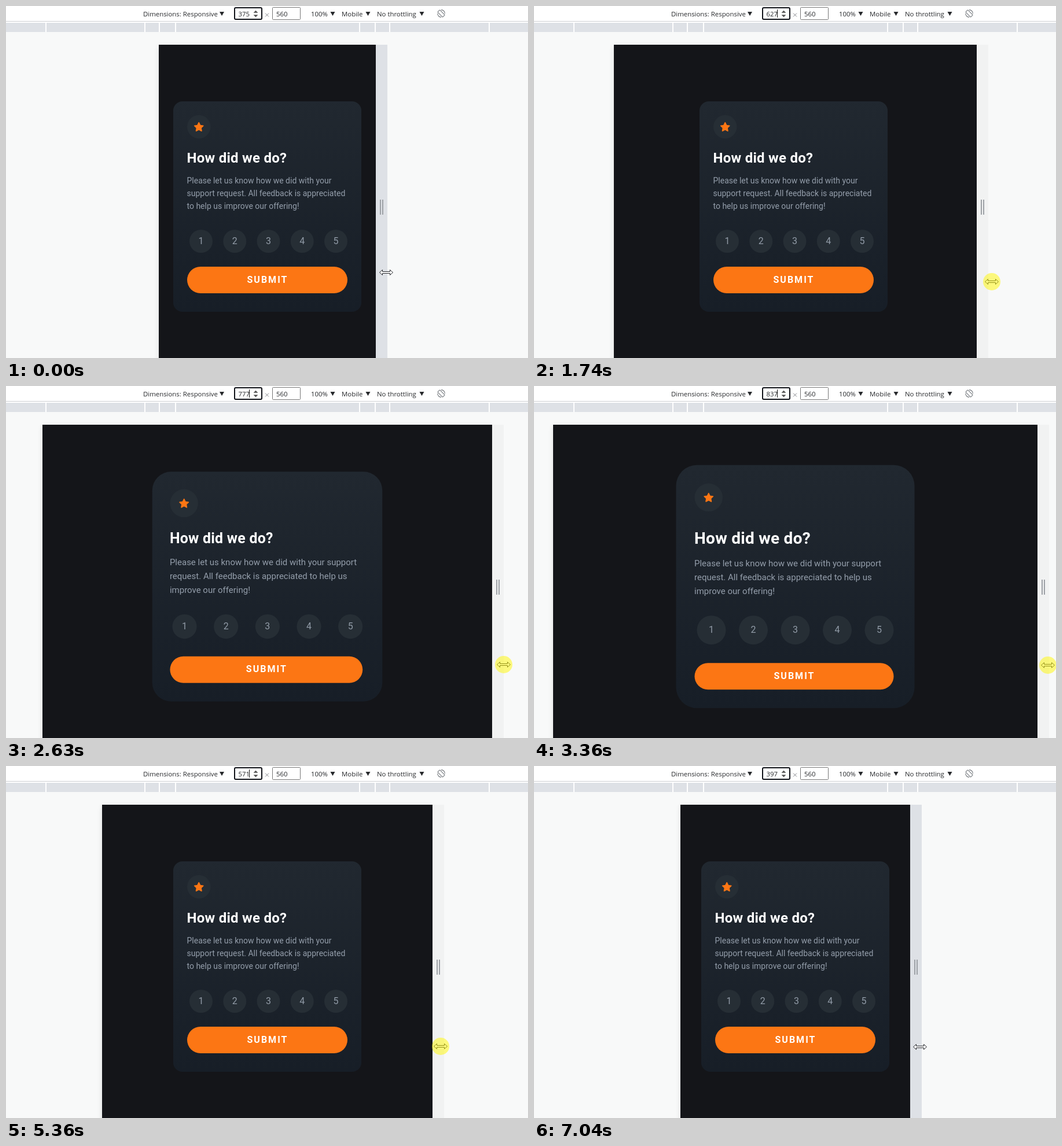
Animation of 902 by 609 pixels, one loop 7170 ms. Source, as an HTML page:

```html
<!DOCTYPE html>
<html lang="en">
<head>
<meta charset="utf-8">
<title>Responsive rating card</title>
<style>
  html, body { margin: 0; width: 100%; height: 100%; overflow: hidden; background: #f8f9f9; }
  svg { display: block; width: 902px; height: 609px; }
  .bar { font: 11.4px "Open Sans", "Noto Sans", sans-serif; fill: #27292c; }
  .card { font-family: Roboto, sans-serif; }
  #title { font-weight: 700; letter-spacing: .25px; fill: #fff; }
  #para { fill: #949eab; }
  .num { font-size: 16px; fill: #929ca8; text-anchor: middle; }
  #label { font-size: 16px; font-weight: 700; letter-spacing: 2px; fill: #fff; text-anchor: middle; }
</style>
</head>
<body>
<svg id="stage" viewBox="0 0 902 609" xmlns="http://www.w3.org/2000/svg">
  <defs>
    <linearGradient id="fill" x1="0" y1="0" x2="0" y2="1">
      <stop offset="0" stop-color="#212830"/>
      <stop offset="1" stop-color="#171e27"/>
    </linearGradient>
    <filter id="blur" x="-10%" y="-10%" width="120%" height="120%"><feGaussianBlur stdDeviation="5"/></filter>
  </defs>
  <rect width="902" height="609" fill="#f8f9f9"/>

  <rect id="shadow" y="70" height="560" opacity=".1" filter="url(#blur)"/>
  <rect id="band" y="67" width="20" height="560"/>
  <path id="grip" fill="#9da1a6"/>
  <rect id="page" y="67" height="560" fill="#141519"/>

  <g class="card">
    <rect id="panel" fill="url(#fill)"/>
    <circle id="badge" fill="#262e35"/>
    <path id="star" fill="#fc7614" stroke="#fc7614" stroke-width="1.6" stroke-linejoin="round"/>
    <text id="title">How did we do?</text>
    <g id="para"><text></text><text></text><text></text></g>
    <g id="rates"></g>
    <rect id="button" height="46" rx="23" fill="#fc7614"/>
    <text id="label">SUBMIT</text>
  </g>

  <rect width="902" height="45" fill="#fff"/>
  <rect y="26" width="902" height="1" fill="#cbcdd1"/>
  <rect y="29" width="902" height="16" fill="#dee1e6"/>
  <path id="marks" stroke="#fff" stroke-width="2"/>
  <g class="bar">
    <text x="237" y="18">Dimensions: Responsive</text>
    <text x="527" y="18">100%</text>
    <text x="580" y="18">Mobile</text>
    <text x="641" y="18">No throttling</text>
    <rect x="395" y="3" width="47" height="20" rx="2" fill="#fff" stroke="#101218" stroke-width="2"/>
    <text id="size" x="401.5" y="18"></text>
    <rect x="460.5" y="2.5" width="48" height="21" rx="1" fill="#fff" stroke="#767676"/>
    <text x="467" y="18">560</text>
  </g>
  <path d="M427.5 11.8L431.5 7.8L435.5 11.8ZM427.5 15.2L431.5 19.2L435.5 15.2Z" fill="#505050"/>
  <path d="M448 12.5l6 6m0-6l-6 6" stroke="#85888c"/>
  <path id="drops" fill="#27292c"/>
  <g transform="translate(752 13) rotate(45)" fill="none" stroke="#75797e" stroke-width="1.1">
    <rect x="-6.2" y="-2.7" width="12.4" height="5.4" rx="1"/>
    <path d="M-4.6 -4.4A6.4 6.4 0 0 1 4.6 -4.4M4.6 4.4A6.4 6.4 0 0 1 -4.6 4.4"/>
  </g>
  <rect id="caret" x="420" y="6" width="1" height="14" fill="#101010"/>

  <g id="pointer">
    <path d="M-11.5 0L-6.5 -4.5V-1.5H6.5V-4.5L11.5 0L6.5 4.5V1.5H-6.5V4.5Z" fill="#fff" stroke="#26282c"/>
    <circle id="glow" r="15" fill="#fff700"/>
  </g>
</svg>
<script>
const LOOP = 7170, MID = 451.5, BREAK = 768;
const $ = id => document.getElementById(id);
const set = (el, attrs) => { for (const k in attrs) el.setAttribute(k, attrs[k]); };
const clamp = x => Math.max(0, Math.min(1, x));
const mix = (a, b, k) => a + (b - a) * k;

// time, page width, pointer offset from the page edge, pointer y, refreshes until the next key
const keys = [
  [0, 375, 18, 461, 1], [590, 375, 18, 461, 1], [660, 379, 19, 462, 10],
  [1340, 499, 24, 471, 1], [1420, 523, 25, 473, 5], [1740, 627, 26, 477, 1],
  [1820, 647, 25, 478, 4], [2090, 699, 21, 480, 1], [2140, 707, 21, 480, 7],
  [2630, 777, 20, 482, 1], [2690, 787, 20, 482, 2], [2830, 805, 20, 483, 1],
  [2890, 811, 20, 483, 7], [3360, 837, 18, 483, 1], [4360, 837, 18, 483, 1],
  [4430, 823, 14, 483, 4], [4700, 745, 5, 483, 6], [5100, 645, 7, 484, 1],
  [5170, 626, 9, 484, 3], [5360, 571, 14, 485, 7], [5830, 481, 13, 485, 1],
  [5890, 471, 13, 485, 9], [6500, 397, 17, 486, 1], [LOOP, 397, 17, 486, 1]
];
const secant = i => keys[i] && keys[i + 1] ? (keys[i + 1][1] - keys[i][1]) / (keys[i + 1][0] - keys[i][0]) : 0;
const slope = i => {
  const a = secant(i - 1), b = secant(i);
  return a * b > 0 ? 2 * a * b / (a + b) : 0;
};

function pose(t) {
  let i = 0;
  while (i < keys.length - 2 && t >= keys[i + 1][0]) i++;
  const a = keys[i], b = keys[i + 1], span = b[0] - a[0], n = a[4];
  const k = Math.floor((t - a[0]) / span * n + 1e-6) / n;
  const u = 1 - k;
  const w = a[1] * (1 + 2 * k) * u * u + b[1] * k * k * (3 - 2 * k)
    + span * k * u * (slope(i) * u - slope(i + 1) * k);
  return {
    time: a[0] + span * k,
    width: 2 * Math.round((w - 1) / 2) + 1,
    off: Math.round(mix(a[2], b[2], k)),
    y: Math.round(mix(a[3], b[3], k))
  };
}

const wraps = {
  narrow: ["Please let us know how we did with your", "support request. All feedback is appreciated", "to help us improve our offering!"],
  medium: ["Please let us know how we did with your", "support request. All feedback is appreciated to", "help us improve our offering!"],
  wide: ["Please let us know how we did with your support", "request. All feedback is appreciated to help us", "improve our offering!"]
};

function starPath(cx, cy) {
  let d = "";
  for (let i = 0; i < 10; i++) {
    const r = i % 2 ? 4 : 8, a = i * Math.PI / 5 - Math.PI / 2;
    d += (i ? "L" : "M") + (cx + r * Math.cos(a)).toFixed(2) + " " + (cy + r * Math.sin(a)).toFixed(2);
  }
  return d + "Z";
}

const NS = "http://www.w3.org/2000/svg";
const rates = [1, 2, 3, 4, 5].map(n => {
  const disc = document.createElementNS(NS, "circle"), text = document.createElementNS(NS, "text");
  set(disc, { fill: "#262e35" });
  set(text, { class: "num" });
  text.textContent = n;
  $("rates").append(disc, text);
  return { disc, text };
});
set($("marks"), { d: [69, 240, 265, 293, 611, 638, 663, 835].map(x => `M${x} 28V45`).join("") });
set($("drops"), { d: [373, 564.5, 625.5, 718.5].map(x => `M${x - 4} 10h8l-4 7z`).join("") });

// box: card size and padding, type: title and rating discs
function growth(t) {
  if (t < 3800) return { box: clamp((t - 2560) / 84), type: clamp((t - 2560) / 150) ** 2 };
  return { box: 1 - clamp((t - 4632) / 103), type: 1 - clamp((t - 4632) / 175) ** 2 };
}

function drawCard(t, width) {
  const { box, type } = growth(t), wide = width >= BREAK ? 1 : 0;
  const mid = MID - (t > 1600 && t < 1900 ? 3 : 0);
  const cardW = mix(325, 412, box), pad = mix(24, 32, box);
  const x = mid - cardW / 2, left = x + pad, right = x + cardW - mix(24, 36, box);
  const badge = wide ? 48 : 40, lead = wide ? 24 : 22, disc = mix(40, 50, type);
  const gaps = [pad, badge, mix(42, 56, type), 36 + 1.7 * (wide + type), 2 * lead, 36 + wide, disc, pad, 46, 32];
  const cardH = gaps.reduce((a, b) => a + b);
  let y = 347 - cardH / 2;
  set($("panel"), { x, y, width: cardW, height: cardH, rx: mix(16, 36, box) });

  const r = badge / 2 + .25, cy = y + pad + badge / 2;
  set($("badge"), { cx: left + r, cy, r });
  set($("star"), { d: starPath(left + r, cy + .7) });

  y += pad + badge + gaps[2];
  set($("title"), { x: left - .5, y, "font-size": mix(24, 28, type) });
  y += gaps[3];
  const lines = wraps[wide ? "wide" : right - left > 292 ? "medium" : "narrow"];
  [...$("para").children].forEach((el, i) => {
    set(el, { x: left - .5, y: y + i * lead, "font-size": wide ? 15 : 14 });
    el.textContent = lines[i];
  });

  y += gaps[4] + gaps[5] + disc / 2;
  rates.forEach((rate, i) => {
    const cx = mix(left + 4 + disc / 2, right - disc / 2, i / 4);
    set(rate.disc, { cx, cy: y, r: disc / 2 });
    set(rate.text, { x: cx, y: y + 4.5 });
  });

  y += disc / 2 + pad;
  set($("button"), { x: left, y, width: right - left });
  set($("label"), { x: (left + right) / 2 + .5, y: y + 27.5 });
}

function draw(t) {
  const p = pose(t), x = MID - p.width / 2, edge = x + p.width;
  set($("page"), { x, width: p.width });
  set($("shadow"), { x, width: p.width });
  set($("band"), { x: edge, fill: t < 660 || t >= 6500 ? "#dee1e6" : "#f1f2f2" });
  set($("grip"), { d: `M${edge + 7} 335h2v26h-2zM${edge + 11} 335h2v26h-2z` });
  set($("pointer"), { transform: `translate(${edge + p.off} ${p.y})` });
  set($("glow"), { opacity: t < 130 || t >= 6840 ? 0 : t >= 6770 ? .25 : .5 });
  set($("caret"), { opacity: t >= 330 && t < 7040 ? 1 : 0 });
  $("size").textContent = p.width;
  drawCard(p.time, p.width);
}

const start = performance.now();
function frame() {
  draw((performance.now() - start) % LOOP);
  requestAnimationFrame(frame);
}
frame();
</script>
</body>
</html>
```
